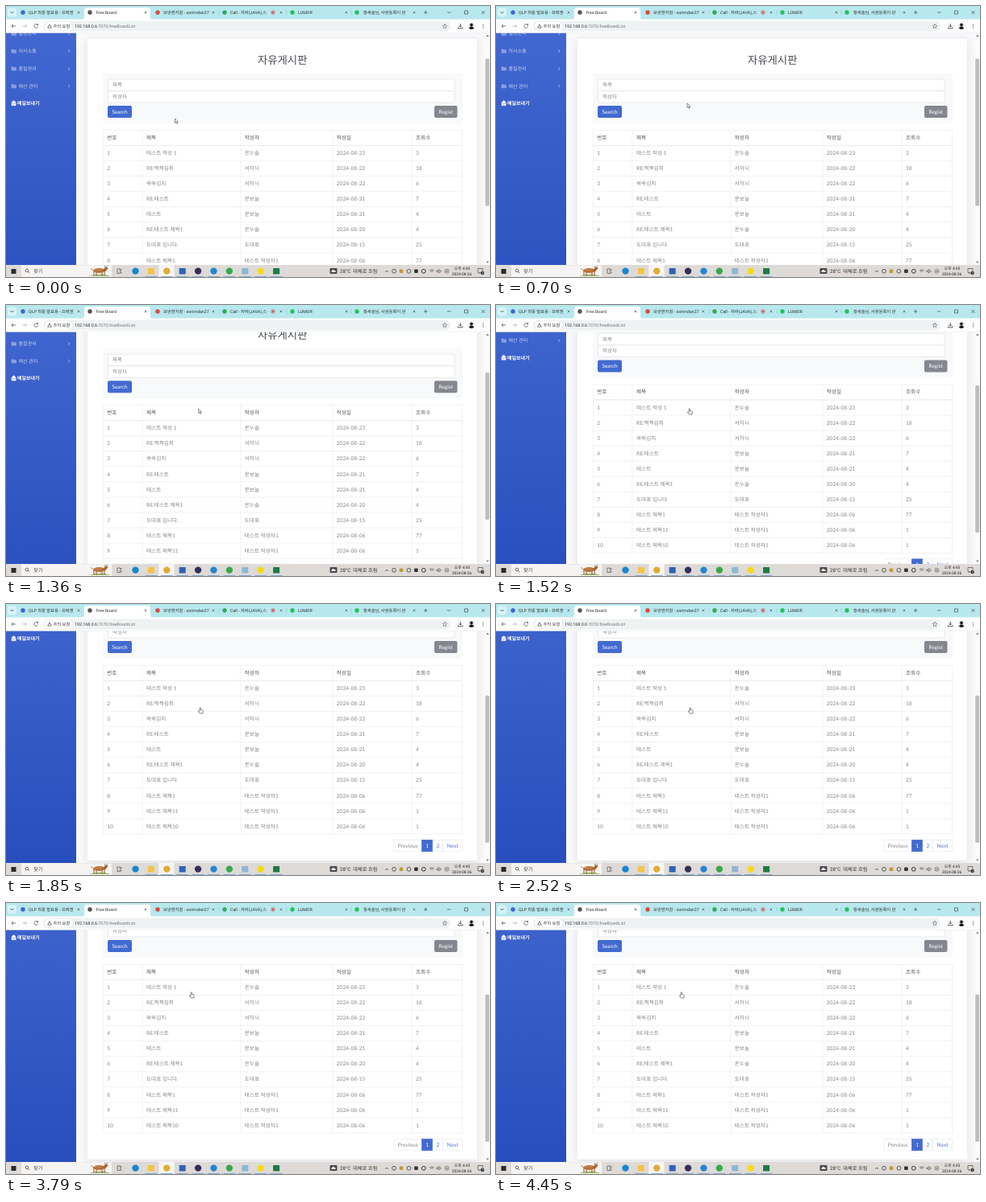
An HTML page for the animation above (4510 ms loop, 600 by 337 pixels).

```html
<!DOCTYPE html>
<html lang="ko">
<head>
<meta charset="utf-8">
<style>
  html, body { margin: 0; width: 100%; height: 100%; overflow: hidden; background: #f9f9fb; }
  svg { display: block; width: 100vw; height: 100vh; }
  text { font-family: Lato, "Noto Sans CJK KR", "Noto Sans CJK", sans-serif; text-rendering: geometricPrecision; white-space: pre; }
  .ui { font-family: Roboto, "Noto Sans CJK KR", "Noto Sans CJK", sans-serif; }
</style>
</head>
<body>
<svg id="stage" viewBox="0 0 600 337" preserveAspectRatio="none"></svg>
<script>
const LOOP = 4510;
const BLUE = '#426ad0', GREY = '#85868f', DARK = '#55565e', BORDER = '#e8e9ef';

const rect = (x, y, w, h, fill, more = '') =>
  `<rect x="${x}" y="${y}" width="${w}" height="${h}" fill="${fill}" ${more}/>`;
const dot = (x, y, r, fill, more = '') => `<circle cx="${x}" cy="${y}" r="${r}" fill="${fill}" ${more}/>`;
const path = (d, stroke, width = 0.7, fill = 'none') =>
  `<path d="${d}" stroke="${stroke}" stroke-width="${width}" fill="${fill}" stroke-linejoin="round"/>`;
// y is the vertical middle of the text
const text = (x, y, s, size, fill, more = '') =>
  `<text x="${x}" y="${y + size * 0.36}" font-size="${size}" fill="${fill}" ${more}>${s}</text>`;
const ui = (x, y, s, size, fill = '#333', more = '') => text(x, y, s, size, fill, 'class="ui" ' + more);
const middle = 'text-anchor="middle"';
const cross = (x, y, r, color = '#444') =>
  path(`M${x - r} ${y - r}l${2 * r} ${2 * r}m0 ${-2 * r}l${-2 * r} ${2 * r}`, color, 0.6);

function sidebar() {
  const items = ['일정관리', '의사소통', '품질관리', '예산 관리'];
  let out = rect(0, -12, 87, 430, 'url(#side)');
  items.forEach((name, i) => {
    const y = 34.2 + i * 21.8;
    out += path(`M7 ${y - 2}h2l.8 .8h2.7v3.4h-5.5z`, '#a9b9e8', 0.5, '#869cdc')
      + text(15.6, y, name, 6, '#c9d3f2')
      + path(`M77.2 ${y - 1.8}l1.8 1.8l-1.8 1.8`, '#b9c6ee', 0.8);
  });
  return out + path('M7 119.8l2.6-2.2l2.6 2.2v4h-5.2z', '#fff', 0.4, '#fff')
    + path('M7.2 120.4l2.4 1.8l2.4-1.8', BLUE, 0.6)
    + text(14, 121.1, '메일보내기', 6, '#fff', 'font-weight="700"');
}

function searchPanel() {
  const field = (y, h, label) =>
    rect(126.5, y, 429.5, h, '#fff', 'stroke="#d6d7df" stroke-width=".5" rx="1"') + text(132, y + h / 2 - 0.3, label, 6.4, GREY);
  const button = (x, w, fill, label) =>
    rect(x, 124, w, 15, fill, 'rx="2"') + text(x + w / 2, 131.3, label, 6.5, '#fff', middle);
  return rect(120, 84, 446, 62, '#f8f9fa', 'rx="2"')
    + field(91, 14.5, '제목') + field(105.5, 14.5, '작성자')
    + button(126, 30, BLUE, 'Search') + button(531, 28.5, GREY, 'Regist');
}

function table() {
  const edges = [120.3, 169, 290.8, 404.8, 503, 565.7];
  const top = 154.5, first = 173.5, step = 19.05;
  const rows = [
    ['테스트 작성 1', '온누솔', '23', 3],
    ['RE:쩍쩍김취', '서하늬', '22', 18],
    ['쏙쏙김치', '서하늬', '22', 6],
    ['RE:테스트', '문보늘', '21', 7],
    ['테스트', '문보늘', '21', 4],
    ['RE:테스트 제목1', '온누솔', '20', 4],
    ['도대표 입니다.', '도대표', '15', 25],
    ['테스트 제목1', '테스트 작성자1', '06', 77],
    ['테스트 제목11', '테스트 작성자1', '06', 1],
    ['테스트 제목10', '테스트 작성자1', '06', 1]
  ];
  const bottom = first + rows.length * step;
  const cells = (list, y, fill, more) => list.map((s, i) => text(edges[i] + 5, y, s, 6.6, fill, more)).join('');
  let out = cells(['번호', '제목', '작성자', '작성일', '조회수'], 163.2, DARK, 'font-weight="500"');
  let lines = `M120 ${top}H566`;
  rows.forEach(([title, writer, day, views], i) => {
    const y = first + i * step;
    out += cells([i + 1, title, writer, '2024-08-' + day, views], y + 9.3, GREY);
    lines += `M120 ${y}H566`;
  });
  lines += `M120 ${bottom}H566` + edges.map(x => `M${x} ${top}V${bottom}`).join('');
  return path(lines, BORDER, 0.6) + path(`M120 ${first}H566`, BORDER, 0.8) + out;
}

function pager() {
  const buttons = [['Previous', 481, 34.3], ['1', 515.3, 13.7], ['2', 529, 12.6], ['Next', 541.6, 24]];
  return buttons.map(([label, x, w]) => {
    const on = label === '1';
    const color = on ? '#fff' : label === 'Previous' ? GREY : '#4e73df';
    return rect(x, 371.3, w, 14.6, on ? BLUE : '#fff', `stroke="${on ? BLUE : '#e0e1ea'}" stroke-width=".5"`)
      + text(x + w / 2, 378.4, label, 6.6, color, middle);
  }).join('');
}

function browser() {
  const tabs = [
    [21, 28, 90, 'QLP 최종 발표용 - 프레젠', '#3f63d8'],
    [104, 111.5, 173, 'Free Board', '#555'],
    [188, 195, 257, '보낸편지함 - sorimdan27', '#d94a3e'],
    [271, 278, 341, 'Call - 자바(JAVA),스', '#35a853'],
    [355, 362, 422, 'LUMOR', '#1fc45c'],
    [435, 443, 506, '황새솔님, 사원등록이 완', '#1fc45c']
  ];
  let out = rect(0, 0, 600, 17, '#b7e8ee')
    + rect(2, 2.5, 11, 11, '#d8f3f6', 'rx="3"') + path('M5.5 7l2 2l2-2', '#333', 0.8)
    + path('M94 17q3 0 3-3v-9q0-3 3-3h76q3 0 3 3v9q0 3 3 3z', 'none', 0, '#fff');
  tabs.forEach(([icon, x, close, title, color], i) => {
    const end = i === 3 ? 326 : close - 3;
    out += dot(icon, 8, 2.7, color)
      + `<svg x="${x}" y="0" width="${end - x}" height="17">${ui(0, 8.2, title, 5.3)}</svg>`
      + cross(close, 8, 1.4);
    if (i > 2) out += path(`M${icon - 7} 5v6`, '#8fbcc4', 0.5);
  });
  out += dot(331, 8, 2.3, 'none', 'stroke="#d5473f" stroke-width=".7"') + dot(331, 8, 1.2, '#d5473f')
    + path('M518 8h4.4m-2.2-2.2v4.4M547 8h4.5M568.5 6h4v4h-4z', '#333', 0.6) + cross(591.5, 8, 2, '#333');

  return out + rect(0, 16.5, 600, 17, '#fdfdfd')
    + path('M12 25h-5m2-2l-2 2l2 2', '#444') + path('M20.5 25h5m-2-2l2 2l-2 2', '#aaa')
    + path('M39.3 23.6a2.4 2.4 0 1 0 .3 2M39.6 22v1.8h-1.8', '#444')
    + rect(46, 18.8, 505, 12.6, '#eef2f3', 'rx="6.3"') + rect(48.5, 20, 33.5, 10.2, '#fff', 'rx="5.1"')
    + path('M54 22.8l2.4 4.4h-4.8zM54 24.2v1.4', '#333', 0.6) + ui(58.5, 25.1, '주의 요함', 5.3)
    + ui(85, 25.1, '192.168.0.6<tspan fill="#777">:7070/freeBoardList</tspan>', 5.3)
    + path('M544 22.2l.8 1.9l2 .2l-1.5 1.4l.4 2l-1.7-1l-1.7 1l.4-2l-1.5-1.4l2-.2z', '#444', 0.5)
    + path('M563.3 22v4m-1.8-1.6l1.8 1.8l1.8-1.8M560.5 26.4v1.5h5.6v-1.5', '#333', 0.8)
    + dot(577, 25, 4, '#e4e4e8') + dot(577, 23.4, 1.8, '#151515') + path('M573.8 27.7q3.2-5 6.4 0q-3.2 2.6-6.4 0z', 'none', 0, '#151515')
    + [23, 25, 27].map(y => dot(591.5, y, 0.6, '#444')).join('')
    + path('M0 33.4H600', '#e3e6e8', 0.5);
}

function taskbar() {
  let out = rect(0, 322, 600, 15, '#dedad8')
    + rect(6.5, 327, 6, 6, '#2b2b2b')
    + rect(19, 322.4, 112, 14.6, '#f5f4f3')
    + dot(26, 329, 1.8, 'none', 'stroke="#333" stroke-width=".7"') + path('M27.3 330.3l1.8 1.8', '#333')
    + ui(34, 329.8, '찾기', 6.2, '#444');

  // deer standing on grass
  out += path('M103 336q14-5 27 0z', 'none', 0, '#9db56c')
    + path('M109 330v5M112 331v4.6M119 331v4.6M122 330v5', '#8c552d', 1)
    + '<ellipse cx="115.5" cy="329" rx="7.6" ry="3" fill="#b9713b"/>'
    + path('M120 329l3-4.2l4 .9l-2 2.2l-2 2.6z', 'none', 0, '#a9642f')
    + path('M123.4 325l-1-2m2 2l1.6-2.3M107.6 328l-2.4-1.4', '#7b4a26', 0.7)
    + [111, 114, 117].map(x => dot(x, 328, 0.5, '#f4dfc4')).join('');

  out += path('M138 327h3.6v5.5h-3.6zM143 327v2m0 1.5v2', '#333', 0.6);
  out += rect(189.5, 322, 19, 15, '#f6f5f4');
  const apps = ['#1687cf', '#f4c445', '#e2ab32', '#2d62b5', '#332f58', '#2386d1', '#38a84b', '#8cb8d2', '#f7d916', '#1c7b45'];
  apps.forEach((color, i) => {
    const x = 160.5 + i * 19.4;
    out += [1, 3, 7, 9].includes(i) ? rect(x - 4, 326, 8, 7.5, color, 'rx=".6"') : dot(x, 329.6, 4.2, color);
    if (i) out += rect(x - 7.5, 336.2, 15, 0.8, '#6d9fcb');
  });

  out += rect(401.5, 326, 9, 7, '#47494d', 'rx="1"') + path('M403.5 331h5q1-2-1.4-2.2q-1.6-2-2.8 .3q-1.8 .3-.8 1.9z', 'none', 0, '#e6e6e6')
    + ui(414, 329.8, '28°C  대체로 흐림', 6.2, '#333')
    + path('M470 331l2-2l2 2', '#333');
  const tray = ['#555', '#c19a3a', '#555', '#333', '#333'];
  tray.forEach((color, i) => {
    out += i % 2 ? rect(478.5 + i * 9.2, 327.5, 4.6, 4.6, color, 'rx="1"') : dot(481 + i * 9.2, 329.8, 2.4, 'none', `stroke="${color}"`);
  });
  return out + path('M525 329q2.8-2.4 5.6 0m-4.4 1.3q1.6-1.4 3.2 0M534 329h1.3l1.6-1.5v4.6l-1.6-1.5h-1.3zm4.5-.7q1 1.5 0 3', '#333', 0.6)
    + dot(546.5, 329.8, 2.5, 'none', 'stroke="#555" stroke-width=".6"') + cross(546.5, 329.8, 1.2)
    + ui(565.5, 326.4, '오후 4:45', 4.8, '#222', middle) + ui(565, 333.4, '2024-08-26', 4.8, '#222', middle)
    + path('M585 326.5h6v5h-3l-1.5 1.5v-1.5h-1.5z', '#333', 0.6) + dot(590.6, 332, 2.2, '#333')
    + ui(590.6, 332, '2', 3.4, '#fff', middle);
}

const stage = document.getElementById('stage');
stage.innerHTML = `
  <defs>
    <linearGradient id="side" x1="0" y1="0" x2="0" y2="1">
      <stop offset=".1" stop-color="#4267d0"/><stop offset="1" stop-color="#264dbb"/>
    </linearGradient>
    <filter id="shadow" x="-5%" y="-8%" width="110%" height="116%">
      <feDropShadow dx="0" dy="2" stdDeviation="5" flood-color="#3a3b45" flood-opacity=".14"/>
    </filter>
  </defs>
  ${rect(0, 0, 600, 337, '#f9f9fb')}
  <g id="page">
    ${rect(101, 41, 483, 356, '#fff', 'filter="url(#shadow)"')}
    ${sidebar()}
    ${text(342.7, 66.7, '자유게시판', 13.4, '#4a4b52', middle + ' font-weight="300"')}
    ${searchPanel()}${table()}${pager()}
  </g>
  ${rect(593.5, 33, 6.5, 290, '#fafafa')}
  ${path('M595 38l1.9-2.4l1.9 2.4zM595 317.5l1.9 2.4l1.9-2.4z', 'none', 0, '#8b8b8b')}
  ${rect(594.2, 65.5, 4.9, 183, '#bdbdbd', 'id="thumb" rx="1.5"')}
  ${browser()}${taskbar()}
  <g id="arrow">${path('M0 0v5.4l1.3-1.1l.9 2l.9-.4l-.9-1.9h1.7z', '#333', 0.55, '#fff')}</g>
  <g id="hand">${path('M-.7-3q.7-1 1.3 0v2.3l2.4 .6q.7 .3 .6 1.2l-.5 2.6h-3.6l-2-2.7q.4-1 1.8 0z', '#333', 0.6, '#fff')}</g>`;

const [page, thumb, arrow, hand] = ['page', 'thumb', 'arrow', 'hand'].map(id => document.getElementById(id));

// keys are [time, value]; each span eases in and out
function track(keys, t) {
  const i = keys.findIndex(k => k[0] > t);
  if (i === 0) return keys[0][1];
  if (i < 0) return keys[keys.length - 1][1];
  const [[t0, a], [t1, b]] = [keys[i - 1], keys[i]];
  const u = (t - t0) / (t1 - t0);
  return a + (b - a) * u * u * (3 - 2 * u);
}

const scrollKeys = [[1180, 0], [1370, 30], [1660, 78]];
const xKeys = [[0, 209.5], [600, 237], [850, 237], [1300, 238.5], [1700, 240.8], [2650, 240.8], [3100, 229.8]];
const yKeys = [[0, 140], [600, 121], [850, 121], [1300, 129], [2650, 129], [3100, 111]];

function draw(now) {
  const t = now % LOOP;
  const scroll = track(scrollKeys, t);
  const x = track(xKeys, t), y = track(yKeys, t);
  const overRow = y > 173.5 - scroll;
  page.setAttribute('transform', `translate(0 ${-scroll})`);
  thumb.setAttribute('y', 65.5 + scroll * 0.62);
  arrow.setAttribute('transform', `translate(${x} ${y})`);
  hand.setAttribute('transform', `translate(${x} ${y + 3.3})`);
  arrow.setAttribute('visibility', overRow ? 'hidden' : 'visible');
  hand.setAttribute('visibility', overRow ? 'visible' : 'hidden');
  requestAnimationFrame(() => draw(performance.now()));
}
draw(0);
</script>
</body>
</html>
```
